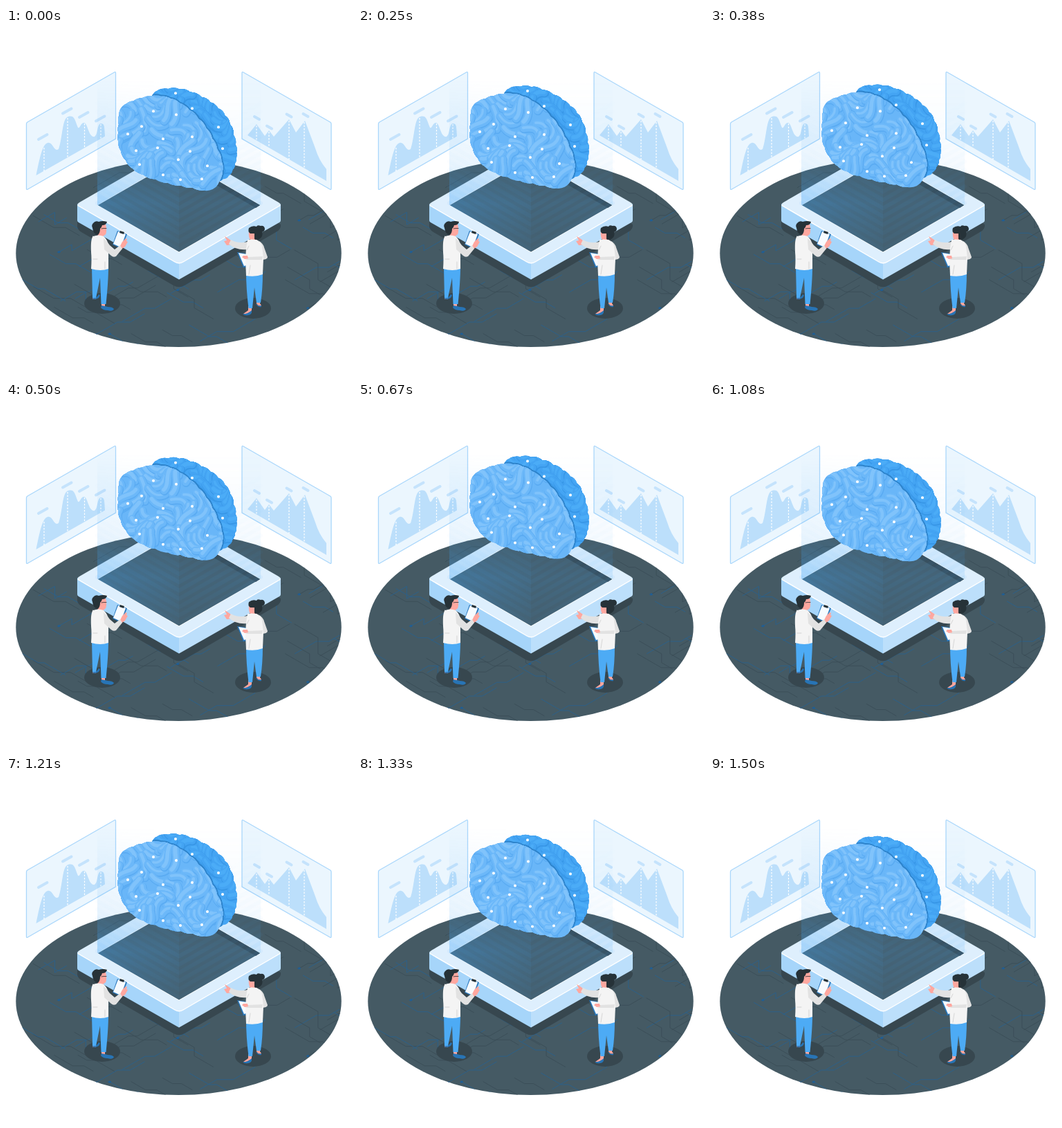
These frames come from a looping animation (500 px wide and 500 px high, 1.54 s). An HTML page:

```html
<!DOCTYPE html>
<html lang="en">
<head>
<meta charset="utf-8">
<title>Brain hologram</title>
<style>
html,body{margin:0;width:100%;height:100%;overflow:hidden;background:#fff}
svg{display:block;width:100vw;height:100vh}
.line{fill:none;stroke-linecap:round;stroke-linejoin:round}
.skin{fill:#ffa79f}
.hair{fill:#263238}
.shoe{fill:#2874b5}
.jeans{fill:#4dabf5}
.coat{fill:#f4f4f4}
.sleeve{fill:#e2e2e2}
</style>
</head>
<body>
<svg viewBox="0 0 500 500">
<defs>
  <linearGradient id="fade" x1="0" y1="75" x2="0" y2="323" gradientUnits="userSpaceOnUse">
    <stop offset="0" stop-color="#fff" stop-opacity="0"/>
    <stop offset=".5" stop-color="#fff" stop-opacity=".35"/>
    <stop offset=".72" stop-color="#fff"/>
    <stop offset="1" stop-color="#fff" stop-opacity=".55"/>
  </linearGradient>
  <mask id="beamMask" maskUnits="userSpaceOnUse" x="0" y="0" width="500" height="500">
    <path fill="url(#fade)" d="M0 0H500V500H0z"/>
  </mask>
  <linearGradient id="beamL"><stop stop-color="#42a5f5" stop-opacity=".36"/><stop offset="1" stop-color="#42a5f5" stop-opacity=".2"/></linearGradient>
  <clipPath id="floorClip"><use href="#floor"/></clipPath>
  <clipPath id="frontClip"><path id="frontShape"/></clipPath>
  <clipPath id="rearClip"><path id="rearShape"/></clipPath>
  <path id="panel" d="M31 136L157 63.800Q158.500 63 158.500 65V160L31 233.200Q29.500 234 29.500 232V138.500Q29.500 137 31 136z"/>
</defs>

<ellipse id="floor" cx="249.500" cy="325.500" rx="235.200" ry="135.500" fill="#455a64"/>
<g id="circuit" class="line" stroke-width=".9" clip-path="url(#floorClip)"></g>

<!-- charts -->
<g fill="#2196f3" fill-opacity=".085" stroke="#aad7fb" stroke-width="1.300">
  <use href="#panel"/>
  <use href="#panel" transform="matrix(-1 0 0 1 499.500 0)"/>
</g>
<path d="M43.500 213C48 192 52 168 60 166S69 180 76 175C82 158 81 130 90 128S99 132 104 144C107 146 108 136 113 137S119 155 126 157 131 138 137 138 142 143 143 156.500z" fill="#bcdffb"/>
<path d="M349 155L362 139 374 156 380 148 387 157 409 132 419 151 432 134 447 174Q452 191 463 204V221z" fill="#bcdffb"/>
<path class="line" stroke="#fff" stroke-width="1.200" stroke-dasharray="2.500 2" style="stroke-linecap:butt" d="M55 173V207M89 130V188M113.500 138V174M137 139V160M362 141V162M380 150V172M409 134V190M431 136V203"/>
<path id="labels" class="line" stroke="#c5e3fc" stroke-width="4"/>

<!-- platform -->
<path d="M103 274L250 190 397 284Q398 291 390 295L258 372Q250 376.500 242 372L109 295Q102 291 103 284z" fill="#37474f"/>
<path d="M103 254V278Q103 280 105 281L250 363.500V335z" fill="#a6d5fa"/>
<path d="M397 254V278Q397 280 395 281L250 363.500V335z" fill="#bcdffb"/>
<path d="M107 251.500L244 172.500Q250 169 256 172.500L393 251.500Q400 255 393 259L256 338Q250 341.500 244 338L107 259Q100 255 107 251.500z" fill="#deeffd"/>
<path class="line" d="M104 256.500L244 338Q250 341.500 256 338L396 256.500" stroke="#fff" stroke-width="1.400"/>
<path d="M132 256L250 188 368 256 250 324z" fill="#455a64" stroke="#fff"/>
<path d="M250 188.500L367 256 361 260 250 196z" fill="#37474f"/>

<!-- light beam -->
<g mask="url(#beamMask)">
  <path d="M132 75H250V323.500L132 256z" fill="url(#beamL)"/>
  <path d="M250 75H368V256L250 323.500z" fill="#42a5f5" fill-opacity=".14"/>
  <g id="bands" class="line" stroke="#42a5f5" stroke-opacity=".06" stroke-width="6"></g>
</g>

<g id="brain">
  <use href="#rearShape" fill="#44a4f3"/>
  <g id="rearFolds" class="line" clip-path="url(#rearClip)"></g>
  <g clip-path="url(#rearClip)"><use href="#frontShape" fill="none" stroke="#2d83cb" stroke-width="4"/></g>
  <use href="#frontShape" fill="#69b6f8"/>
  <g id="frontFolds" class="line" clip-path="url(#frontClip)"></g>
  <g id="dots" fill="#fff"></g>
</g>

<!-- man -->
<ellipse cx="139" cy="398" rx="26" ry="15" fill="#37474f"/>
<path class="skin" d="M125.500 386h4.500v6h-4.500zM138 395h5v8h-5z"/>
<path class="shoe" d="M125 390q6 1 9-5l2 1q-1 6-10 6zM138 401q6 1 9 2 7 0 9 3-2 4-9 2-7 0-10-4z"/>
<path class="jeans" d="M124 345H148Q148 365 144.500 399H137.500L136 361 130 390H125z"/>
<path class="skin" d="M133 292h8v13h-9zM134 284h10q2 6 .5 13-2 4-7 3-5-3-3.500-16z"/>
<path class="hair" d="M126 282q3-4 8-2 6-2 12 0-1 5-7 5-1 4-3 5 0 6-3 9-7-1-8-10-2-4 1-7z"/>
<path d="M138 290l3-.5h4" class="line" stroke="#263238" stroke-width=".8"/>
<path d="M161 293l14 5-8 21-13-6z" fill="#2978bd"/>
<path d="M162 294l11 4-7 19-11-5z" fill="#f7fbff"/>
<path class="hair" d="M165 293l6 2-1 3-6-2z"/>
<path class="skin" d="M164 317l4-8 5-5 2 1-1 3 2 1-4 7-6 4z"/>
<path class="coat" d="M126 301q8-3 15 0 5 4 7 12v35q-11 4-25 0 1-14 0-24-1-19 3-24z"/>
<path class="sleeve" d="M141 304q5 4 9 10l7 6 8-6 3 5-9 11q-4 2-7-1l-10-9z"/>
<path class="line" stroke="#c5c5c5" stroke-width=".7" d="M126 334h6M143 338v10"/>

<!-- woman -->
<ellipse cx="357" cy="405" rx="26" ry="15" fill="#37474f"/>
<path class="skin" d="M350 402h5v7l-7 4h-5l7-5zM362 391h5v7l2 3q-4 2-7-3z"/>
<path d="M342 413q7 1 13-5 1 6-5 7-6 1-8-2zM361 398q4 5 8 3v2q-6 1-8-5z" class="shoe"/>
<path class="jeans" d="M347 353H371Q371 378 368 397H362L359 375 356 405H350.500Q347 377 347 353z"/>
<path d="M334 324l13 2 4 17-8 3z" fill="#2978bd"/>
<path d="M336 325l12 2 2 15-6 2z" fill="#f7fbff"/>
<path class="skin" d="M316 301l5 3 4 3 2 6-8 1-4-6 4-1z"/>
<path class="skin" d="M355 297h8v9q-4 4-8-1zM351 293l9-1v10q-3 5-7 4-3-4-2-13z"/>
<path class="sleeve" d="M325 306q10 6 24 3v11q-16 2-27-8zM366 308q6 4 7 9l5 14q0 4-10 4z"/>
<path class="coat" d="M349 306q6-1 13 0 7 3 8 9l2 18-1 23q-10 4-24 2l-1-23 1-16z"/>
<path class="line" stroke="#cfcfcf" stroke-width=".8" d="M353 343l-2 13M348 321l3-6"/>
<path class="sleeve" d="M371 330l-21 1-4-2-2 2 4 4h22z"/>
<path class="skin" d="M349 329l-6 0-2 2 4 3 5-1z"/>
<path class="hair" d="M351 289q5-4 11-2 1-3 6-1 5-1 6 4 0 4-4 5 2 6-4 10-5 2-7 0l0-8-6 0q-4-3-2-8z"/>
</svg>
<script>
const $ = id => document.getElementById(id);
const times = (n, f) => Array.from({length: n}, (_, i) => f(i));
const pairs = s => s.match(/\S+ \S+/g).map(p => p.split(' ').map(Number));

function seeded(s) {
  return () => (s = (s * 16807) % 2147483647) / 2147483647;
}

// Closed smooth curve through key points, sampled and edged with small bulges.
function lobed(keys, n, k) {
  const p = pairs(keys), len = p.length;
  const at = t => {
    const i = Math.floor(t), f = t - i;
    const [a, b, c, d] = times(4, j => p[(i + j + len - 1) % len]);
    return [0, 1].map(q => b[q] + f / 2 * (c[q] - a[q] + f * (2 * a[q] - 5 * b[q] + 4 * c[q] - d[q]
      + f * (3 * (b[q] - c[q]) + d[q] - a[q]))));
  };
  const e = times(n, i => at(i / n * len));
  return `M${e[0]}` + e.map(([x, y], i) => {
    const [u, v] = e[(i + 1) % n];
    return `Q${(x + u) / 2 + (v - y) * k} ${(y + v) / 2 - (u - x) * k} ${u} ${v}`;
  }).join('') + 'z';
}
$('frontShape').setAttribute('d', lobed(
  '166 116 188 104 219 98 250 108 281 134 302 168 313 205 297 234 262 229 220 220 183 203 164 172 163 143', 30, .17));
$('rearShape').setAttribute('d', lobed(
  '211 98 247 88 290 104 319 130 332 170 331 195 317 217 285 215 250 140', 25, .24));

// Short folds that follow a swirling field; each has a shade, a body and a light.
function folds(id, [x0, y0, x1, y1], seed, [shade, body, light]) {
  const rnd = seeded(seed), gap = 15;
  let out = '';
  for (let y = y0; y < y1; y += gap) for (let x = x0; x < x1; x += gap) {
    let px = x + rnd() * gap, py = y + rnd() * gap, d = `M${px} ${py}`;
    for (let i = 0; i < 11; i++) {
      const a = .6 + 1.3 * Math.sin(px / 17 + py / 40) + Math.cos(py / 15 - px / 50);
      d += `L${(px += 3 * Math.cos(a)).toFixed(1)} ${(py += 3 * Math.sin(a)).toFixed(1)}`;
    }
    out += `<path d="${d}" stroke="${shade}" stroke-width="12" transform="translate(.5 1)"/>`
      + `<path d="${d}" stroke="${body}" stroke-width="10.500"/>`
      + `<path d="${d}" stroke="${light}" stroke-width="${3 + 3 * rnd()}" transform="translate(-.5 -1)"/>`;
  }
  $(id).innerHTML = out;
}
folds('rearFolds', [200, 80, 340, 220], 5, ['#3796e6', '#44a4f3', '#4bacf7']);
folds('frontFolds', [145, 85, 315, 235], 11, ['#5aabf2', '#6cb8f9', '#80c3fb']);

const dots = '245 94 269 116 307 143 313 174 213 120 246 125 196 142 176 153 227 160 269 157 188 177 219 173 266 178 193 197 249 190 291 199 227 212 252 219 283 218';
$('dots').innerHTML = pairs(dots).map(([x, y]) => `<circle cx="${x}" cy="${y + .2}" r="2"/>`).join('');

const bar = (x, y, w, h) => `M${x} ${y}l${w} ${h}`;
$('labels').setAttribute('d',
  [[47, 161], [82, 123.5], [106, 129], [130, 134.5]].map(([x, y]) => bar(x, y, 12.5, -7)).join('')
  + [[359, 128], [377, 141.5], [405.5, 124.5], [429.5, 124]].map(([x, y]) => bar(x, y, 7, 4)).join(''));

// Circuit traces: slanted runs joined by a level or upright one.
function circuit() {
  const rnd = seeded(77), SLOPE = .577;
  return times(95, i => {
    const x = 15 + 470 * rnd(), y = 195 + 265 * rnd(), side = rnd() < .5 ? -1 : 1;
    const run = 10 + 28 * rnd(), link = 8 + 16 * rnd(), tail = 10 + 22 * rnd();
    const slant = w => `l${w} ${w * SLOPE * side}`;
    const color = i % 2 ? '#2a618d' : '#3a4d57';
    const end = i % 5 ? '' : `<path d="M${x - 2} ${y}l2-1.200 2 1.200-2 1.200z" fill="#1f5f97" stroke="#1f5f97"/>`;
    return `<path d="M${x} ${y}${slant(run)}${rnd() < .7 ? 'h' : 'v'}${link}${slant(tail)}" stroke="${color}"/>` + end;
  }).join('');
}
$('circuit').innerHTML = circuit();

$('bands').innerHTML = times(13, i => `<path d="M132 ${253 - 12 * i}l118 67.500 118-67.500"/>`).join('');

// Linear float of 10 units up and back, shown at 24 steps a second.
const LOOP = 1540, STEPS = 37, RISE = 10;
function draw(ms) {
  const step = Math.floor((ms % LOOP) / LOOP * STEPS + .1) % STEPS;
  const phase = (step + 1) % STEPS / STEPS;
  const lift = RISE * (1 - Math.abs(1 - 2 * phase));
  $('brain').setAttribute('transform', `translate(0 ${(.54 - lift).toFixed(2)})`);
}
const start = performance.now();
function tick(now) {
  draw(Math.max(0, now - start));
  requestAnimationFrame(tick);
}
draw(0);
requestAnimationFrame(tick);
</script>
</body>
</html>
```
